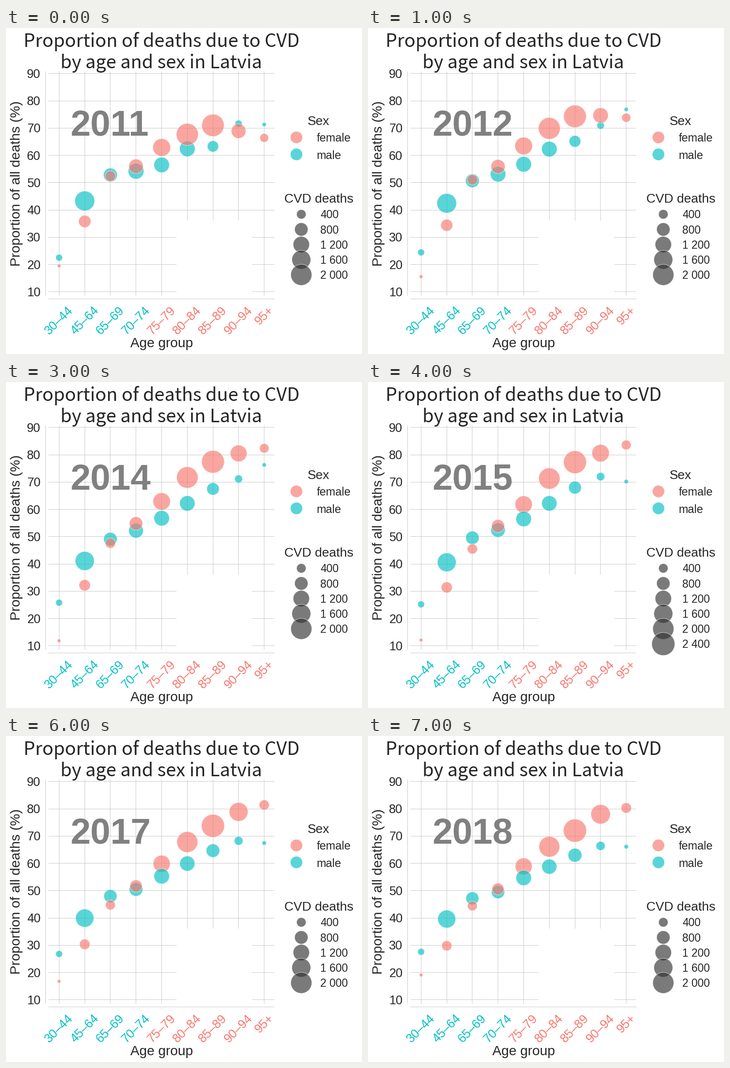
Animation, 733 px wide and 672 px high, one loop 8000 ms. Source, as a matplotlib script:

```python
import matplotlib.pyplot as plt
import numpy as np
from matplotlib.animation import FuncAnimation
from matplotlib.patches import Circle, Rectangle

W, H, DPI = 733, 672, 100
PX = 72 / DPI  # points per pixel
FEMALE, MALE = "#F8766D", "#00BFC4"
INK, GRID, GREY = "#262626", "#cccccc", "#808080"
AGES = ["30–44", "45–64", "65–69", "70–74", "75–79",
        "80–84", "85–89", "90–94", "95+"]
YEARS = range(2011, 2019)

# Share of deaths in percent by age group at each turn of the trend
TURNS = [2011, 2013, 2015, 2018]
SHARE = {
    MALE: [[22.5, 43.3, 52.8, 54.2, 56.5, 62.4, 63.3, 71.6, 71.3],
           [26.4, 41.6, 48.6, 52.0, 57.0, 62.2, 67.0, 70.3, 82.4],
           [25.2, 40.6, 49.6, 52.4, 56.5, 62.2, 68.0, 72.0, 70.2],
           [27.6, 39.6, 47.2, 49.5, 54.7, 58.8, 63.0, 66.4, 66.1]],
    FEMALE: [[19.5, 35.8, 52.4, 56.0, 62.9, 67.7, 71.0, 68.9, 66.4],
             [11.6, 33.0, 49.7, 55.8, 64.0, 72.1, 77.6, 80.4, 81.2],
             [12.1, 31.4, 45.5, 53.9, 61.8, 71.3, 77.3, 80.6, 83.6],
             [19.1, 29.8, 44.4, 50.6, 58.9, 66.1, 72.0, 78.0, 80.3]],
}

# Bubble radius in pixels by age group, in the first and the last year
RADIUS = {
    MALE: [[7, 20.4, 14.2, 16.2, 15.9, 16, 11.6, 7.4, 4.3],
           [7, 18.4, 13.3, 13.6, 15.8, 15.4, 14.2, 9.3, 4.5]],
    FEMALE: [[3.8, 12.6, 10.8, 14.9, 18.2, 22.6, 23, 15, 9],
             [3.6, 10.4, 10, 12.2, 17.3, 21.3, 23.8, 20, 10.6]],
}


def trend(year, years, rows):
    """Interpolate every age group linearly between the given years."""
    return [np.interp(year, years, values) for values in zip(*rows)]


def legend_values(year):
    step = 500 if year in (2013, 2016) else 400
    return range(step, 2401 if year == 2015 else 2001, step)


def age_x(i):
    return 108.8 + 52.8 * i


def share_y(p):
    return 93.3 + (90 - p) * 5.625


fig = plt.figure(figsize=(W / DPI, H / DPI), dpi=DPI, facecolor="white")
ax = fig.add_axes([0, 0, 1, 1])
ax.set_xlim(-0.5, W - 0.5)
ax.set_ylim(H - 0.5, -0.5)
ax.axis("off")


def text(x, y, s, size, color=INK, ha="left", va="baseline",
         font="Liberation Sans", **kw):
    return ax.text(x, y, s, fontsize=size * PX, color=color, ha=ha, va=va,
                   family=font, **kw)


def line(x0, y0, x1, y1):
    ax.plot(np.round([x0, x1]), np.round([y0, y1]), color=GRID, lw=PX,
            zorder=1, snap=False, solid_capstyle="butt")


def bubble(x, y, r, color):
    return ax.add_patch(Circle((x, y), r, facecolor=color, edgecolor="white",
                               lw=PX, alpha=0.65, zorder=4))


def draw_axes():
    for i, age in enumerate(AGES):
        x = age_x(i)
        line(x, 89, x, 551)
        text(x, 569, age, 25.2, MALE if i < 4 else FEMALE, "center", "top",
             rotation=45)
    for p in range(10, 91, 10):
        y = share_y(p)
        line(87, y, 552, y)
        text(71, y + 9, str(p), 25.2, ha="right")
    line(81, 89, 81, 551)
    line(87, 558, 552, 558)
    # Blank panel in the lower right of the plot
    ax.add_patch(Rectangle((350, 396), 156, 155, fc="white", lw=0, zorder=2))
    text(320, 657, "Age group", 28, ha="center")
    text(29, 320.5, "Proportion of all deaths (%)", 28.1, ha="center",
         rotation=90, rotation_mode="anchor")


def draw_titles():
    for y, s in ((39, "Proportion of deaths due to CVD"),
                 (82, "by age and sex in Latvia")):
        text(319.5, y, s, 37.8, ha="center", font="Noto Sans CJK JP")
    text(642.5, 199, "Sex", 26.2, ha="center")
    for y, s, color in ((225, "female", FEMALE), (260, "male", MALE)):
        bubble(597.5, y, 12.5, color)
        text(639, y + 9, s, 23.4)
    text(643.5, 360, "CVD deaths", 26.4, ha="center")


draw_axes()
draw_titles()
year_label = text(131.5, 221.5, "", 74.5, GREY, weight="bold", zorder=3)
moving = []


def draw_bubbles(year):
    share = {c: trend(year, TURNS, SHARE[c]) for c in SHARE}
    radius = {c: trend(year, [YEARS[0], YEARS[-1]], RADIUS[c]) for c in RADIUS}
    for i, age in enumerate(AGES):
        # Men lie on top only in the middle group
        for c in (FEMALE, MALE) if age == "75–79" else (MALE, FEMALE):
            moving.append(bubble(age_x(i), share_y(share[c][i]),
                                 radius[c][i], c))


def draw_size_legend(year):
    for k, n in enumerate(legend_values(year)):
        y = 383.5 + 31.2 * k
        moving.append(bubble(607.5, y, 0.484 * n ** 0.5, "#333333"))
        label = f"{n:,}".replace(",", " ")
        moving.append(text(646.5, y + 8.5, label, 22.7))


def update(i):
    while moving:
        moving.pop().remove()
    year = YEARS[i]
    year_label.set_text(str(year))
    draw_bubbles(year)
    draw_size_legend(year)
    return []


anim = FuncAnimation(fig, update, frames=len(YEARS), interval=1000,
                     repeat=True, repeat_delay=0, blit=False)
plt.show()
```
